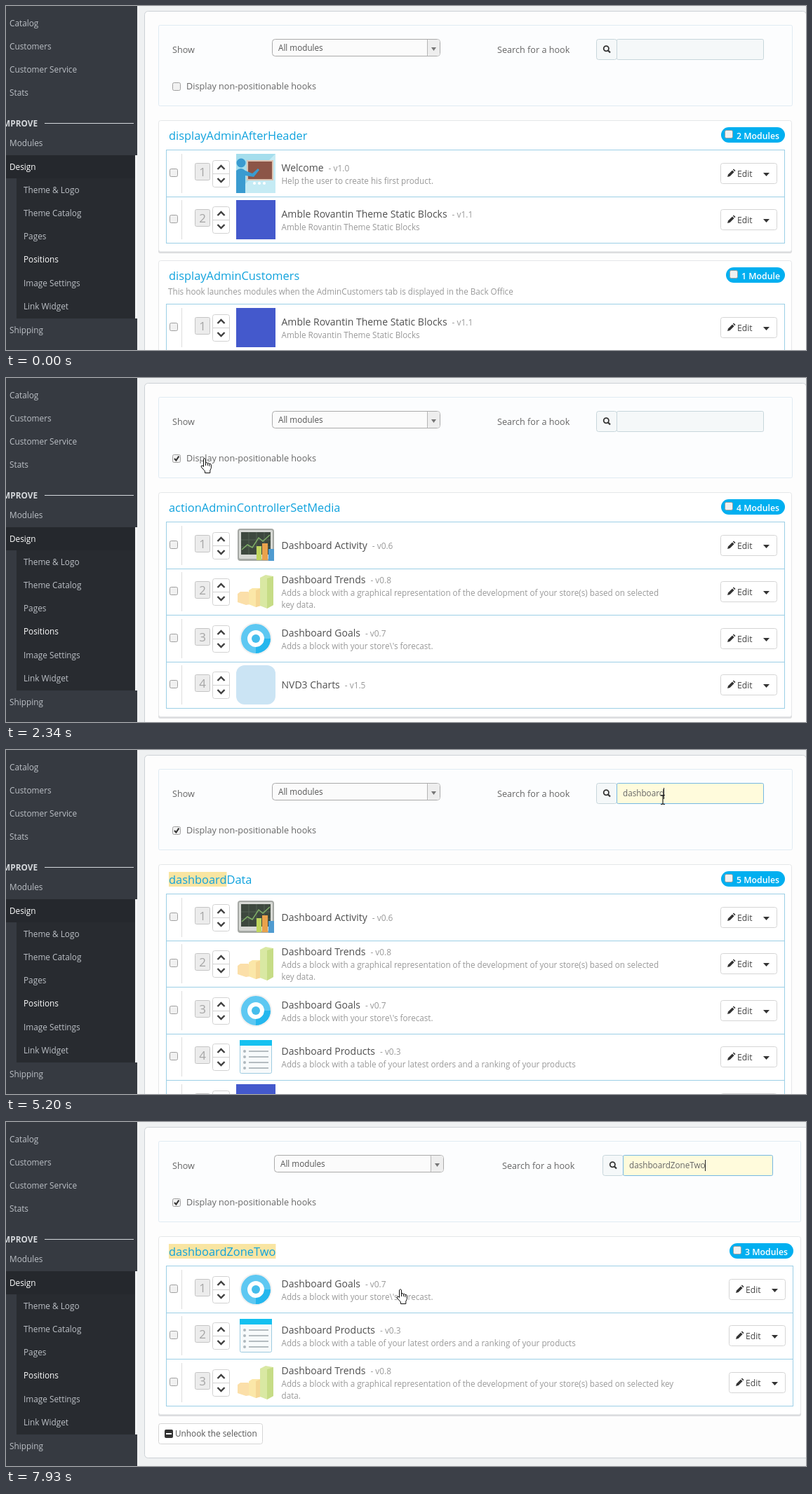
Animation, 1140 px wide and 491 px high, one loop 8 s. Source, as an HTML page:

```html
<!DOCTYPE html>
<html lang="en">
<head>
<meta charset="utf-8">
<title>Module positions</title>
<style>
html, body { margin: 0; width: 100%; height: 100%; overflow: hidden; background: #eff1f2; }
svg { display: block; font-family: "Open Sans", sans-serif; white-space: pre; }
</style>
</head>
<body>
<svg id="stage" width="1140" height="491" viewBox="0 0 1140 491"></svg>
<script>
const LOOP = 8000, STEP = 130, BLINK = 520;
const CHECK = 2340, FOCUS = 3380;
const ROW = 66.5;
const QUERY = 'dashboardZoneTwo';
// [time, typed letters]
const KEYS = [[4290, 2], [4420, 3], [4550, 4], [4810, 5], [4940, 6], [5070, 8], [5200, 9],
  [5590, 10], [5720, 11], [5850, 13], [6240, 14], [6500, 15], [6630, 16]];

const stage = document.getElementById('stage');
const pen = document.createElement('canvas').getContext('2d');
const measure = (s, size) => {
  pen.font = `${size}px "Open Sans", sans-serif`;
  return pen.measureText(s).width;
};

const text = (x, y, size, fill, s, extra = '') =>
  `<text x="${x}" y="${y}" font-size="${size}" fill="${fill}" ${extra}>${s}</text>`;
const rect = (x, y, w, h, fill, extra = '') =>
  `<rect x="${x}" y="${y}" width="${w}" height="${h}" fill="${fill}" ${extra}/>`;
const box = (x, y, w, h, fill, stroke, r = 0) =>
  rect(x + .5, y + .5, w - 1, h - 1, fill, `stroke="${stroke}" rx="${r}"`);
const path = (d, fill, stroke = 'none', w = 1, extra = '') =>
  `<path d="${d}" fill="${fill}" stroke="${stroke}" stroke-width="${w}" ${extra}/>`;
const disc = (x, y, r, fill, extra = '') => `<circle cx="${x}" cy="${y}" r="${r}" fill="${fill}" ${extra}/>`;
const at = (x, y, s) => `<g transform="translate(${x} ${y})">${s}</g>`;

const tile = rect(0, 0, 56, 56, '#a5deed') + path('M0 56L56 0V56Z', '#c5ebf4');
const ICONS = {
  welcome: tile + rect(15, 9, 38, 29, '#dcc3b2') + rect(17, 11, 34, 25, '#8c5547') +
    path('M0 56V24Q7 18 13 24L23 28L31 21L33 23L25 33L13 31V56Z', '#3a9bd0') + disc(7, 13, 6.5, '#3a9bd0') +
    [26, 33, 40].map(x => disc(x, 42, 2, '#fff')).join(''),
  brand: rect(0, 0, 56, 56, '#4459cc'),
  charts: rect(0, 0, 56, 56, '#cbe4f4', 'rx="12"'),
  activity: rect(2, 4, 52, 46, '#a5a8a4', 'rx="4"') + rect(4, 6, 48, 41, '#d6d8d4', 'rx="2"') +
    rect(7, 9, 42, 32, '#3d483e') + path('M7 20H49M7 30H49M18 9V41M29 9V41M40 9V41', 'none', '#526052') +
    path('M8 34L16 27L23 31L32 17L38 22L48 13', 'none', '#7fae68', 1.5) +
    rect(29, 29, 7, 20, '#bfd65c') + rect(37, 25, 8, 24, '#e9a24c') + rect(46, 33, 8, 17, '#4f9bd0'),
  trends: path('M2 31L6 28H17L20 31V46L14 47L2 43Z', '#fbdfa9') + path('M18 26L23 23H35V48L28 50L18 46Z', '#fbe7a8') +
    path('M28 26L35 23V48L28 50Z', '#f5d795') + path('M34 8L42 4L53 6V47L44 52L34 48Z', '#d9e8a3') +
    path('M44 9L53 6V47L44 52Z', '#c6dc86'),
  goals: disc(28, 28, 23, '#f1f1f1') + disc(28, 28, 16.5, '#fff', 'stroke="#5ec8f2" stroke-width="9"') +
    path('M44.5 28A16.5 16.5 0 0 1 28 44.5', 'none', '#25b7ee', 9) + disc(28, 28, 6, '#45bdec'),
  products: box(5, 4, 46, 48, '#f7fafb', '#9ecbe0', 2) + rect(5, 4, 46, 8, '#14c1f0') +
    [18, 26, 34, 42].map(y => rect(10, y, 4, 4, '#aeb8bd', 'rx="2"') + rect(18, y + 1, 28, 2, '#b4bcc0')).join(''),
  contact: tile + path('M11 19Q17 15 19 20L21 27Q17 29 18 31Q20 37 27 39L30 36L37 39Q39 43 35 46Q28 49 19 42Q7 31 11 19Z', '#d6005f') +
    disc(37, 19, 10, '#36b4d3') + text(34.8, 24, 14, '#fff', 'i', 'font-weight="700"'),
  faceted: tile + [11, 24, 37].map(y => path(`M10 ${y + 3}l4 4l7-8`, 'none', '#d6005f', 3) +
      path(`M23 ${y + 4}H${y > 30 ? 28 : 44}`, 'none', '#36a9c8', 4)).join('') +
    disc(37, 39, 6, '#e8f7fb', 'stroke="#d6005f" stroke-width="3"') + path('M41 44L47 50', 'none', '#d6005f', 4),
  featured: tile + [[6, '#36b4d3'], [15, '#36a9c8']].map(([x, c]) =>
      path(`M${x} 18L${x + 10} 16L${x + 15} 35L${x + 9} 40L${x} 28Z`, c)).join('') +
    path('M27 16L38 15L52 29L40 42L27 28Z', '#d6005f') + disc(32, 20, 2, '#d5f0f6')
};

const CURSORS = {
  arrow: path('M.5 .5V16L4 12.7L6.6 18.5L9 17.5L6.5 11.8H11.5Z', '#fff', '#000'),
  hand: path('M4.5 1.8Q6 -.5 7.5 1.8V7Q9.2 6 10.4 7.6Q12 6.8 12.9 8.4Q15 8 15.4 10V14.5L13.8 18V21.5H6.5V19L1.2 13Q.5 10.6 3 11L4.5 12.5Z' +
    'M7.5 7V11M10.4 8V11M12.9 9V12', '#fff', '#111'),
  beam: path('M-3 -6.5H-1L0 -5.5L1 -6.5H3M0 -5.5V5.5M-3 6.5H-1L0 5.5L1 6.5H3', 'none', '#222', 1.2)
};

const BRAND = 'Amble Rovantin Theme Static Blocks';
const MODULES = {
  welcome: ['Welcome', '1.0', 'Help the user to create his first product.'],
  brand: [BRAND, '1.1', BRAND],
  activity: ['Dashboard Activity', '0.6'],
  trends: ['Dashboard Trends', '0.8',
    'Adds a block with a graphical representation of the development of your store(s) based on selected', 'key data.'],
  goals: ['Dashboard Goals', '0.7', "Adds a block with your store\\'s forecast."],
  products: ['Dashboard Products', '0.3', 'Adds a block with a table of your latest orders and a ranking of your products'],
  charts: ['NVD3 Charts', '1.5'],
  contact: ['Contact information', '1.0',
    "Allows you to display additional information about your store's customer service."],
  faceted: ['Faceted search', '1.1', 'Displays a block allowing multiple filters.'],
  featured: ['Featured products', '1.0', 'Displays featured products in the central column of your homepage.']
};

// [hook, modules, note]
const ZONE_TWO = ['dashboardZoneTwo', 'goals products trends'];
const VIEWS = {
  start: [['displayAdminAfterHeader', 'welcome brand'],
    ['displayAdminCustomers', 'brand', 'This hook launches modules when the AdminCustomers tab is displayed in the Back Office']],
  all: [['actionAdminControllerSetMedia', 'activity trends goals charts']],
  da: [['actionAdminStoresControllerUpdate_optionsAfter', 'contact'],
    ['actionCategoryUpdate', 'faceted featured brand', 'This hook is displayed when a category is modified']],
  dash: [['dashboardData', 'activity trends goals products brand']],
  zones: [['dashboardZoneOne', 'activity'], ZONE_TWO],
  two: [ZONE_TWO]
};

const checkbox = (x, y, on) => box(x, y, 12, 12, '#f1f1f1', '#a0a0a0', 2) +
  (on ? path(`M${x + 3} ${y + 6}l2.4 2.6l4-6`, 'none', '#333', 2) : '');

function sidebar() {
  const item = (y, s, x = 5, fill = '#bcc0c6') => text(x, y, 11.8, fill, s);
  let out = rect(0, 0, 187, 491, '#363a41') + rect(184, 213, 3, 233, '#f4f5f6') +
    rect(0, 213, 184, 33, '#25282d') + rect(15, 246, 169, 200, '#282b30');
  ['Catalog', 'Customers', 'Customer Service', 'Stats'].forEach((s, i) => out += item(29 + Math.floor(i * 33.3), s));
  out += text(45, 172, 11.8, '#d5d8dc', 'IMPROVE', 'font-weight="700" text-anchor="end"') + rect(55, 167, 127, 1, '#d5d8dc') +
    item(200, 'Modules') + item(234, 'Design', 5, '#fff');
  ['Theme &amp; Logo', 'Theme Catalog', 'Pages', 'Positions', 'Image Settings', 'Link Widget'].forEach((s, i) =>
    out += item(267 + Math.floor(i * 33.3), s, 25, s === 'Positions' ? '#fff' : undefined));
  return out + item(467, 'Shipping');
}

function filters(t, typed, wide) {
  const label = (x, y, s) => text(x, y, 12.65, '#666', s);
  const sx = wide ? 382 : 379, sw = wide ? 242 : 240, ix = wide ? 850 : 841, iw = wide ? 243 : 239;
  const focused = t >= FOCUS;
  let out = box(217, 27, wide ? 916 : 904, 116, '#fcfdfe', '#e0ebf3', 2) +
    label(237, 67, 'Show') + label(wide ? 707 : 700, 67, 'Search for a hook') +
    label(257, 119, 'Display non-positionable hooks') + checkbox(237, 109, t >= CHECK) +
    box(sx, 47, sw, 25, '#fbfbfb', '#aaa', 4) + rect(sx + sw - 18, 48, 17, 23, '#eee', 'rx="3"') +
    rect(sx + sw - 19, 48, 1, 23, '#b5b5b5') + path(`M${sx + sw - 13} 59h7l-3.5 5Z`, '#777') +
    text(sx + 9, 64, 11.7, '#555', 'All modules') +
    box(ix, 47, 30, 30, '#f5f8f9', '#c7d6db', 3) +
    disc(ix + 14.3, 60.8, 3.6, 'none', 'stroke="#333" stroke-width="1.8"') +
    path(`M${ix + 17} 63.5l3 3`, 'none', '#333', 2.2) +
    (focused ? box(ix + 29, 47, iw - 29, 30, '#fffbdc', '#76b8e2', 2) : box(ix + 29, 47, iw - 29, 30, '#f5f8f9', '#c7d6db', 2)) +
    text(ix + 38, 66, 11.7, '#666', typed);
  const last = KEYS.reduce((a, [time]) => time <= t ? time : a, FOCUS);
  if (focused && Math.floor((t - last) / BLINK) % 2 === 0)
    out += rect(Math.floor(ix + 38 + measure(typed, 11.7)), 54, 1, 16, '#222');
  return out;
}

function row(name, i, y, dx, wide) {
  let [title, version, ...lines] = MODULES[name];
  if (wide && lines[1]) lines = [lines[0] + ' key', 'data.'];
  const base = y + [38, 30, 21][lines.length];
  const ex = 1018 + dx;
  return checkbox(233, y + 26) + rect(250, y + 5, 1, 56, '#ddd') +
    box(269, y + 18, 22, 25, '#ececec', '#c4c4c4', 2) + text(280, y + 36.5, 17, '#a5a5a5', i + 1, 'text-anchor="middle"') +
    box(294, y + 14, 25, 39, '#fff', '#d2d2d2', 3) + rect(294, y + 33, 25, 1, '#d2d2d2') +
    path(`M301.5 ${y + 27}l5-5l5 5M301.5 ${y + 40}l5 5l5-5`, 'none', '#3f3f3f', 2.4) +
    at(328, y + 5, ICONS[name]) +
    text(392.5, base, 14, '#4f4f4f', title) +
    text(392.5 + measure(title, 14) + 7, base, 11.9, '#999', '- v' + version) +
    lines.map((s, k) => text(392.5, base + 17.5 + 17 * k, 11.7, '#999', s)).join('') +
    box(ex, y + 18, 81, 30, '#fff', '#d5d5d5', 3) +
    path(`M${ex + 10} ${y + 38}l1-3.6l6-6l2.6 2.6l-6 6Z`, '#333') + path(`M${ex + 17.8} ${y + 27.6}l1.1-1.1l2.6 2.6l-1.1 1.1Z`, '#333') +
    text(ex + 24, y + 37.5, 12.2, '#444', 'Edit') + path(`M${ex + 61} ${y + 32}h9l-4.5 5Z`, '#333');
}

function cards(view, typed, wide) {
  const dx = wide ? 12 : 0, cw = wide ? 916 : 903;
  let y = 163, out = '';
  for (const [hook, list, note] of view) {
    const names = list.split(' '), n = names.length;
    const top = y + (note ? 62 : 42), bottom = Math.round(top + n * ROW), end = bottom + 13;
    const many = n > 1 ? 's' : '', bx = (many ? 1019 : 1026) + dx;
    out += rect(217, y + 2, cw, end - y, '#dcdddf', 'rx="3"') + box(217, y, cw, end - y, '#fff', '#e5e7e9', 3);
    const pos = typed ? hook.indexOf(typed) : -1;
    if (pos >= 0)
      out += rect(232 + measure(hook.slice(0, pos), 16.4), y + 11, measure(typed, 16.4), 21, '#f9e5a2');
    out += text(232, y + 28, 16.4, '#0fa2dd', hook) +
      rect(bx, y + 10, 1110 + dx - bx, 22, '#00aff0', 'rx="11"') + checkbox(bx + 5, y + 14) +
      text(bx + 22, y + 26.5, 12.3, '#fff', `${n} Module${many}`, 'font-weight="600"');
    if (note) out += text(231, y + 48.5, 11.7, '#999', note);
    out += box(228, top, 882 + dx, bottom - top + 1, '#fff', '#9ccfe6');
    names.forEach((name, i) => {
      if (i) out += rect(228, Math.round(top + i * ROW), 882 + dx, 1, '#9ccfe6');
      out += row(name, i, top + 1 + Math.floor(i * ROW), dx, wide);
    });
    y = end + 12;
  }
  const panel = box(197, 7, wide ? 957 : 944, y + 43, '#fdfdfd', '#cdd2d6', 5);
  return [panel, out + box(217, y, 149, 30, '#fff', '#d5d5d5', 3) + rect(226, y + 9, 12, 12, '#333', 'rx="2"') +
    rect(228, y + 14, 8, 2, '#fff') + text(241, y + 19, 11.8, '#555', 'Unhook the selection')];
}

function cursor(t) {
  const glide = (start, steps, kind, x0, y0, x1, y1) => {
    const p = ((t - start) / STEP + 1) / steps, e = p * p * (3 - 2 * p);
    return at(Math.round(x0 + (x1 - x0) * e), Math.round(y0 + (y1 - y0) * e), CURSORS[kind]);
  };
  if (t < 130) return '';
  if (t < 910) return glide(0, 7, 'arrow', 1029, 436, 240, 114);
  if (t < 2860) return at(277, 114, CURSORS.hand);
  if (t < 3380) return glide(2860, 6, t < 2990 ? 'hand' : 'arrow', 277, 114, 936, 71);
  if (t < 3510) return glide(2860, 6, 'beam', 277, 114, 936, 71);
  if (t < 7540) return at(936, 71, CURSORS.beam);
  if (t < 7930) return glide(7540, 4, 'arrow', 936, 71, 556, 238);
  return at(556, 238, CURSORS.hand);
}

function scene(t) {
  const n = KEYS.reduce((a, [time, len]) => time <= t ? len : a, 0);
  const typed = QUERY.slice(0, n), wide = n > 9;
  const view = n > 13 ? 'two' : wide ? 'zones' : n > 2 ? 'dash' : n ? 'da' : t >= CHECK ? 'all' : 'start';
  const [panel, list] = cards(VIEWS[view], typed, wide);
  return rect(0, 0, 1140, 491, '#eff1f2') + panel + sidebar() + filters(t, typed, wide) + list + cursor(t);
}

let shown = -1;
function tick(now) {
  const t = Math.floor(now % LOOP / STEP) * STEP;
  if (t !== shown) stage.innerHTML = scene(shown = t);
  requestAnimationFrame(tick);
}
tick(performance.now());
</script>
</body>
</html>
```
